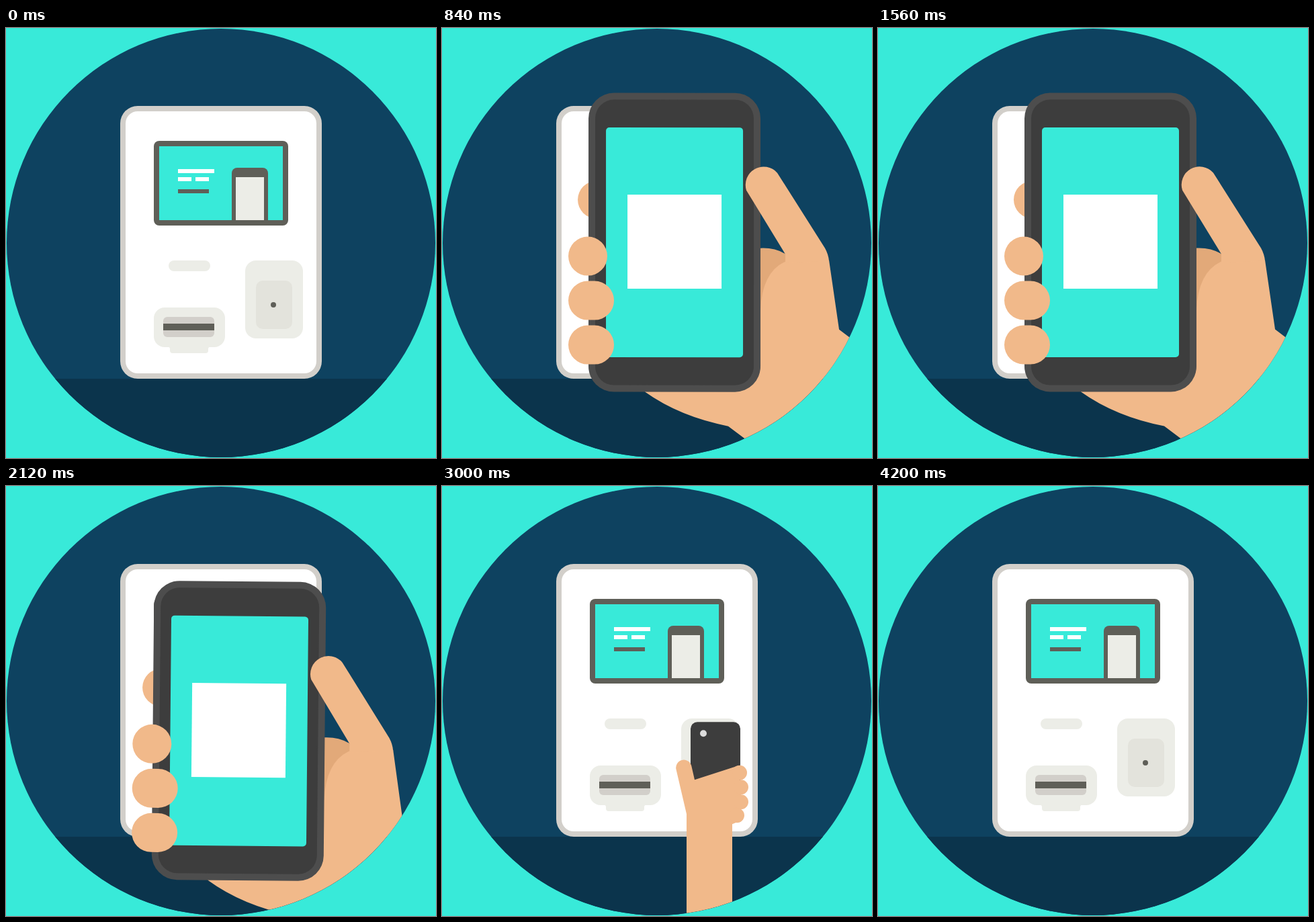
Recreate the animation shown at these times as an HTML page. Size 640x640 px, loop 4.44 s.

```html
<!DOCTYPE html>
<html lang="en">
<head>
<meta charset="utf-8">
<title>Ticket machine</title>
<style>
  html, body { margin: 0; width: 100%; height: 100%; overflow: hidden; background: #38ead9; }
  svg { display: block; width: 100vw; height: 100vh; }
  .wall { fill: #0e4260; }
  .floor { fill: #0b344c; }
  .edge { fill: #d2cfca; }
  .white { fill: #fff; }
  .teal { fill: #38ead9; }
  .grey { fill: #5f5f58; }
  .pale { fill: #ecede7; }
  .pad { fill: #e3e3dc; }
  .rim { fill: #4d4d4d; }
  .dark { fill: #3d3d3d; }
  .skin { fill: #f1b98a; }
  .shade { fill: #e2a979; }
</style>
</head>
<body>
<svg viewBox="0 0 640 640">
  <defs>
    <clipPath id="disc"><circle cx="320" cy="320" r="319"/></clipPath>
  </defs>
  <g clip-path="url(#disc)">
    <rect class="wall" width="640" height="640"/>
    <rect class="floor" y="522" width="640" height="118"/>

    <!-- machine -->
    <rect class="edge" x="170" y="116" width="300" height="406" rx="26"/>
    <rect class="white" x="178" y="124" width="284" height="390" rx="18"/>
    <rect class="grey" x="220" y="168" width="200" height="126" rx="8"/>
    <rect class="teal" x="228" y="176" width="184" height="110"/>
    <path class="white" d="M256 210h54v6h-54zM256 222h20v6h-20zM282 222h20v6h-20z"/>
    <rect class="grey" x="256" y="240" width="46" height="6"/>
    <path class="grey" d="M336 286V216a8 8 0 0 1 8-8h38a8 8 0 0 1 8 8v70z"/>
    <rect class="pale" x="342" y="222" width="42" height="64"/>
    <rect class="pale" x="242" y="346" width="62" height="16" rx="8"/>
    <rect class="pale" x="220" y="416" width="106" height="59" rx="16"/>
    <path class="pale" d="M241 474q3 1 3 4v2q0 4 4 4h49q4 0 4-4v-2q0-3 3-4z"/>
    <rect class="edge" x="234" y="430" width="76" height="30" rx="6"/>
    <rect class="grey" x="234" y="440" width="76" height="10"/>
    <rect class="pale" x="356" y="346" width="86" height="116" rx="16"/>
    <rect class="pad" x="372" y="376" width="54" height="72" rx="10"/>
    <circle class="grey" cx="398" cy="412" r="4"/>

    <!-- hand holding the phone, front view -->
    <g id="front">
      <circle class="skin" cx="228" cy="250" r="28"/>
      <path class="shade" d="M460 322H472Q495 321 511 332V345L472 420H460z"/>
      <path class="skin" d="M509 342Q474 358 472 415H300V536Q352 573 424 587L734 820 900 679 589 443 574 340z"/>
      <rect class="rim" x="216" y="91" width="256" height="445" rx="38"/>
      <rect class="dark" x="226" y="101" width="236" height="425" rx="28"/>
      <rect class="teal" x="242" y="142.5" width="204" height="342" rx="5"/>
      <rect class="white" x="274" y="242.5" width="140" height="140"/>
      <path class="skin" d="M451 236L509 331V344L574 341Q573 331 568 322L497 210A27 27 0 0 0 451 236z"/>
      <circle class="skin" cx="215" cy="334" r="29"/>
      <rect class="skin" x="186" y="371" width="68" height="58" rx="29"/>
      <rect class="skin" x="186" y="437" width="68" height="58" rx="29"/>
    </g>

    <!-- hand holding the phone to the reader, back view -->
    <g id="back">
      <rect class="dark" x="370" y="351" width="74" height="100" rx="10"/>
      <circle cx="389" cy="368" r="5" fill="#dcdcdc"/>
      <path class="skin" d="M348.6 422A11.6 11.6 0 0 1 371.2 416L376 437 441 416 446 470 443 498.500 432 503V1000H364V488z"/>
      <circle class="skin" cx="443" cy="426.500" r="11"/>
      <circle class="skin" cx="445" cy="448" r="11"/>
      <circle class="skin" cx="445" cy="470" r="11"/>
      <circle class="skin" cx="439" cy="490" r="11"/>
    </g>
  </g>
</svg>
<script>
  const LOOP = 4440, STEP = 40;
  const front = document.getElementById('front');
  const back = document.getElementById('back');

  // Damped spring: 1 at rest start, settling to 0; ms in, rates per second.
  function spring(ms, decay, freq) {
    const s = Math.max(ms, 0) / 1000, a = freq * s;
    return Math.exp(-decay * s) * (Math.cos(a) + decay / freq * Math.sin(a));
  }

  function place(el, shown, transform) {
    el.setAttribute('visibility', shown ? 'visible' : 'hidden');
    if (shown) el.setAttribute('transform', transform);
  }

  function drawFront(t) {
    const rise = 516 * spring(t - 560, 8.95, 8.5);
    const drop = Math.max(0, t - 2098) * 2.07;
    const x = 346 + rise * 0.373 + drop * 0.011;
    const y = 319 + rise + drop;
    const turn = rise * 0.0244 + drop * 0.0115;
    place(front, t >= 560 && t < 2400,
      `translate(${x} ${y}) rotate(${turn}) translate(-344 -313.5)`);
  }

  function drawBack(t) {
    const rise = 300 * spring(t - 2540, 7.8, 6.5);
    const drop = Math.max(0, t - 3900);
    place(back, t >= 2600 && t < 4200,
      `translate(${-drop * 0.095} ${7 + rise + drop})`);
  }

  function frame() {
    const t = Math.floor(performance.now() % LOOP / STEP) * STEP;
    drawFront(t);
    drawBack(t);
    requestAnimationFrame(frame);
  }
  frame();
</script>
</body>
</html>
```
